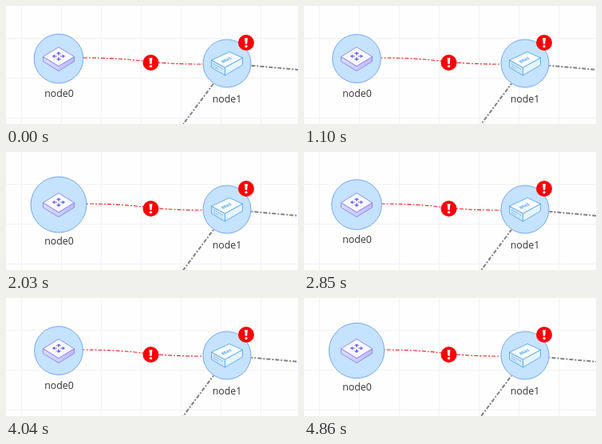
Animation of 366 by 148 pixels, one loop 4.96 s. Source, as an HTML page:

```html
<!DOCTYPE html>
<html lang="en">
<head>
<meta charset="utf-8">
<style>
  html, body { margin: 0; width: 100%; height: 100%; overflow: hidden; background: #fefefe; }
  svg { display: block; }
  text { font-family: "Open Sans", "Noto Sans", sans-serif; font-size: 12.4px; fill: #333; text-anchor: middle; }
  .edge { fill: none; stroke: #808080; stroke-width: 2; stroke-dasharray: 5 2 2 2; }
  .disc { fill: #c5e3ff; stroke: #74a5f6; }
  .router { stroke: #8583ee; stroke-width: .9; stroke-linejoin: round; }
  .switch { stroke: #55a6f0; stroke-width: .9; stroke-linejoin: round; }
</style>
</head>
<body>
<svg width="366" height="148" viewBox="0 0 366 148">
  <defs>
    <pattern id="grid" x="19" y="-10" width="50" height="50" patternUnits="userSpaceOnUse">
      <path d="M.5 0V50M0 .5H50" stroke="#f2f2f2" fill="none"/>
    </pattern>
    <linearGradient id="lilac" x2="1">
      <stop stop-color="#dcdbff"/><stop offset="1" stop-color="#bdbbfa"/>
    </linearGradient>
    <path id="arrow" d="M0-7.5L3-4.3H.8V-2H-.8V-4.3H-3Z" fill="#6d69e6" stroke="none"/>
    <g id="alert">
      <circle r="10" fill="#fb0007"/>
      <path d="M-1.9-6H1.9L1.2 1.8H-1.2Z" fill="#fff"/>
      <circle cy="4.6" r="1.7" fill="#fff"/>
    </g>
  </defs>
  <rect width="366" height="148" fill="url(#grid)"/>

  <path class="edge" id="link" style="stroke:#f5171b;stroke-width:1.1"/>
  <path class="edge" d="M307.5 74.7L376 80.8"/>
  <path class="edge" d="M260 97.5L217 155"/>

  <circle class="disc" id="pulse" cx="66" cy="66"/>
  <g class="router">
    <path d="M46.5 63.5V69.5L66 81.5L85.5 69.5V63.5L66 75.5Z" fill="url(#lilac)"/>
    <path d="M66 51.5L85.5 63.5L66 75.5L46.5 63.5Z" fill="#f8f7ff"/>
    <g id="arrows" transform="translate(66 63) scale(1.1 .75)"></g>
  </g>
  <text id="label" x="66.5">node0</text>

  <circle class="disc" cx="277" cy="72" r="30"/>
  <g class="switch">
    <path d="M257.5 68V77L274.5 87V77Z" fill="#cfe8ff"/>
    <path d="M274.5 77V87L296.5 74V65Z" fill="#e6f4ff"/>
    <path d="M257.5 68L280 57.5L296.5 65L274.5 77Z" fill="#f8fcff"/>
    <path d="M260 72.5L272 79.5M260 75.5L266 79" stroke-dasharray="2 1"/>
    <text transform="translate(277.5 69) rotate(-26) skewX(18)" stroke="none" style="font-size:5px;font-weight:700;fill:#55a6f0">BRAS</text>
  </g>
  <text x="277" y="120.5">node1</text>

  <use href="#alert" x="181.5" y="71"/>
  <use href="#alert" x="301" y="46"/>
</svg>
<script>
  const LOOP = 4960, STEP = 135, LEAD = 35;
  const PERIOD = 2950, SMALLEST = 620;

  const get = id => document.getElementById(id);
  const pulse = get("pulse"), label = get("label"), link = get("link");
  const edges = document.querySelectorAll(".edge");

  get("arrows").innerHTML = [0, 90, 180, 270]
    .map(a => `<use href="#arrow" transform="rotate(${a})"/>`).join("");

  // Motion advances in even steps and rests for three of every twenty.
  function stepAt(t) {
    const n = Math.floor((t + LEAD) / STEP), k = n % 20;
    return k > 5 && k < 8 ? n - k + 5 : n;
  }

  function radiusAt(t) {
    const wave = (1 - Math.cos(2 * Math.PI * (t - SMALLEST) / PERIOD)) / 2;
    return 30.1 + 4.9 * wave ** 2;
  }

  function draw(now) {
    const step = stepAt(now % LOOP);
    const r = radiusAt(step * STEP);
    const x = 66 + r, mid = (x + 247) / 2;

    pulse.setAttribute("r", r);
    label.setAttribute("y", 114.3 + (r - 31) * .5);
    link.setAttribute("d", `M${x} 65C${mid} 65 ${mid} 73 247 73`);
    edges.forEach(e => e.style.strokeDashoffset = -step);
  }

  const start = performance.now();
  function frame() {
    draw(performance.now() - start);
    requestAnimationFrame(frame);
  }
  frame();
</script>
</body>
</html>
```
